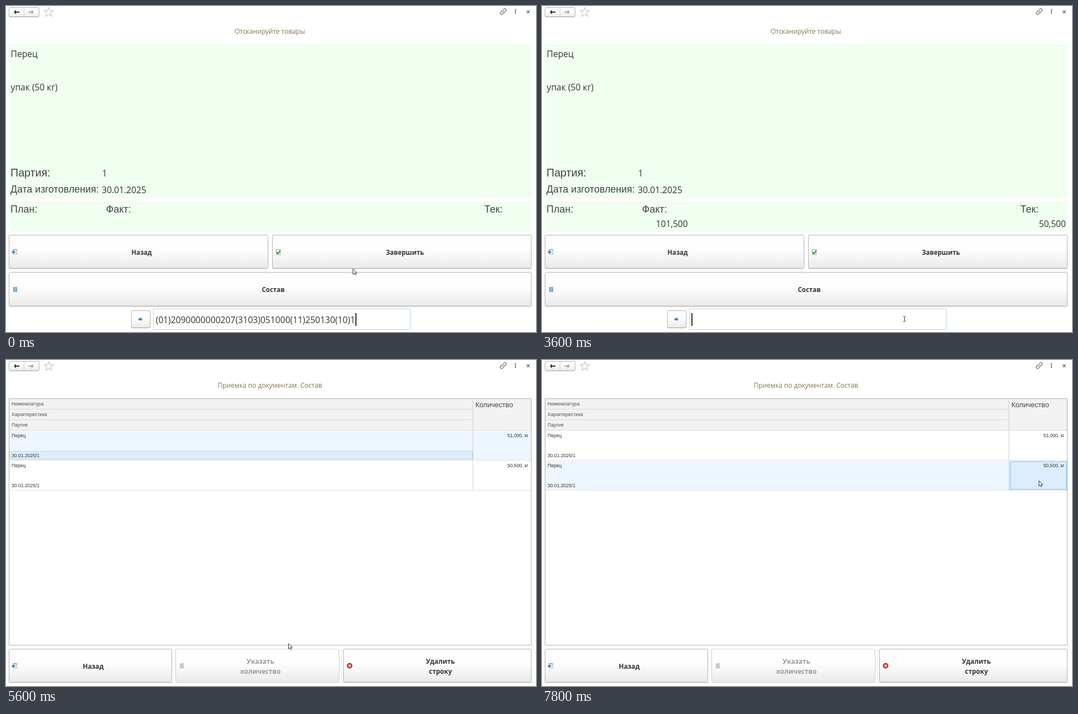
Animation, 954 px wide and 587 px high, one loop 8000 ms. Source, as an HTML page with a canvas:

```html
<!DOCTYPE html>
<html lang="ru">
<head>
<meta charset="utf-8">
<style>
html, body { margin: 0; width: 100%; height: 100%; overflow: hidden; background: #fff; }
canvas { display: block; }
</style>
</head>
<body>
<canvas id="stage" width="954" height="587"></canvas>
<script>
const ctx = document.getElementById('stage').getContext('2d');
const LOOP = 8000, STEP = 200;
const UI = '"Open Sans", sans-serif', ARIAL = '"Liberation Sans", Arial, sans-serif';
const DARK = '#333', BLUE = '#2f78b0', BODY = 15.65;

// Pointer positions: time, x, y
const pointerPath = [
  [0, 624, 473], [200, 627, 483], [400, 640, 515], [600, 652, 550], [800, 652, 562],
  [2800, 652, 563], [4000, 650, 557], [4200, 622, 545], [4400, 572, 529],
  [4600, 532, 516], [4800, 512, 511], [5000, 508, 510],
  [6200, 530, 496], [6400, 640, 400], [6600, 790, 270], [6800, 878, 190],
  [7000, 893, 168], [7200, 895, 165], [7400, 895, 190], [7600, 894, 217]
];

function text(str, x, y, size, { color = DARK, font = UI, align = 'left', weight = 400 } = {}) {
  ctx.font = `${weight} ${size}px ${font}`;
  ctx.fillStyle = color;
  ctx.textAlign = align;
  ctx.fillText(str, x, y);
}

function rect(x, y, w, h, fill) {
  ctx.fillStyle = fill;
  ctx.fillRect(x, y, w, h);
}

function frame(x, y, w, h, color, radius = 0, width = 1) {
  ctx.beginPath();
  ctx.roundRect(x + width / 2, y + width / 2, w - width, h - width, radius);
  ctx.strokeStyle = color;
  ctx.lineWidth = width;
  ctx.stroke();
}

function path(d, x, y, { fill, stroke, width = 1 }) {
  const shape = new Path2D(d);
  ctx.save();
  ctx.translate(x, y);
  if (fill) { ctx.fillStyle = fill; ctx.fill(shape); }
  if (stroke) { ctx.strokeStyle = stroke; ctx.lineWidth = width; ctx.stroke(shape); }
  ctx.restore();
}

function button(x, y, w, h, { state = 'normal', border = '#b2b2b2' } = {}) {
  const shade = ctx.createLinearGradient(0, y, 0, y + h);
  shade.addColorStop(0, state === 'hover' ? '#fafafa' : '#fff');
  shade.addColorStop(.45, state === 'hover' ? '#f6f6f6' : '#fdfdfd');
  shade.addColorStop(1, state === 'hover' ? '#e2e2e2' : '#e9e9e9');
  ctx.beginPath();
  ctx.roundRect(x, y, w, h, 2);
  ctx.fillStyle = state === 'pressed' ? '#e9e9e9' : shade;
  ctx.fill();
  frame(x, y, w, h, state === 'pressed' ? '#96a09c' : border, 2);
  if (state === 'pressed') rect(x + 1, y, w - 2, 2, '#8b9993');
  else if (border === '#b2b2b2') rect(x + 2, y + h - 1, w - 4, 1, '#9c9c9c');
}

function label(str, x, y, size, color = DARK) {
  text(str, x, y, size, { color, align: 'center', weight: 700 });
}

function title(str) {
  text(str, 475, 50, 11.9, { color: '#85774f', align: 'center' });
}

function backIcon(x, y) {
  rect(x + 2, y, 8, 9, '#7fb0d2');
  rect(x + 3, y + 2, 6, 6, '#f4faff');
  path('M0 5L4 2V4H7V6H4V8Z', x, y, { fill: BLUE });
}

function gridIcon(x, y, color, light) {
  rect(x, y, 7, 9, color);
  for (let row = 0; row < 4; row++) rect(x + 1, y + 1 + row * 2, 5, 1, light);
}

function header() {
  button(5, 2, 55, 18);
  rect(32, 3, 1, 16, '#ccc');
  const arrow = 'M-5 0L-1 -4V-1H5V1H-1V4Z';
  path(arrow, 19, 11, { fill: '#333' });
  path('M5 0L1 -4V-1H-5V1H1V4Z', 45, 11, { fill: '#a6a6a6' });
  let star = '';
  for (let i = 0; i < 10; i++) {
    const r = i % 2 ? 3.6 : 9, a = i * Math.PI / 5;
    star += (i ? 'L' : 'M') + r * Math.sin(a) + ' ' + -r * Math.cos(a);
  }
  path(star + 'Z', 77, 11.5, { stroke: '#b8b8b8' });

  ctx.save();
  ctx.translate(895, 10);
  ctx.rotate(-Math.PI / 4);
  path('M1 -2.5H-4A2.5 2.5 0 0 0 -4 2.5H-1M-1 2.5H4A2.5 2.5 0 0 0 4 -2.5H2M-2.5 0H2.5', 0, 0, { stroke: '#555' });
  ctx.restore();
  for (const y of [6, 9, 12]) rect(916, y, 2, 2, '#555');
  path('M-2.5 -2.5L2.5 2.5M2.5 -2.5L-2.5 2.5', 940, 10.5, { stroke: '#555', width: 1.1 });
}

function scanScreen(t, pointer) {
  const pressed = t >= 5400;
  const code = t < 1400 ? '051000' : t >= 2600 && t < 3600 ? '050500' : '';
  const arial = { font: ARIAL, color: '#444' };

  title('Отсканируйте товары');
  rect(5, 69, 941, 277, '#f0fff0');
  rect(5, 352, 941, 54, '#f0fff0');
  text('Перец', 8.5, 92, BODY);
  text('упак (50 кг)', 8.5, 151.5, BODY);
  text('Партия:', 8, 307, 19.7, arial);
  text('1', 173, 307, BODY);
  text('Дата изготовления:', 8, 336, 17.75, arial);
  text('30.01.2025', 172.5, 337, BODY);
  text('План:', 8, 372, 18, arial);
  text('Факт:', 180, 372, 18, arial);
  text('Тек:', 861, 372, 18, arial);
  if (t >= 1400) {
    const second = t >= 3600;
    text(second ? '101,500' : '51,000', 262.5, 397.5, BODY, { align: 'right' });
    text(second ? '50,500' : '51,000', 943, 397.5, BODY, { align: 'right' });
  }

  button(5, 412, 467, 61);
  backIcon(10, 438);
  label('Назад', 244, 447.5, 11.5);
  button(479, 412, 467, 61);
  rect(486, 438, 8, 10, '#9aaba0');
  rect(487, 439, 6, 8, '#f5fff5');
  path('M487 443L489.5 446L494 440', 0, 0, { stroke: '#209a35', width: 2 });
  label('Завершить', 718, 447.5, 11.5);

  const hovered = pointer.y > 479 && pointer.y < 541;
  button(5, 479, 941, 62, { state: pressed ? 'pressed' : hovered ? 'hover' : 'normal' });
  if (pressed) frame(3, 477, 945, 66, '#cfe4f2', 2);
  const shift = pressed ? 1 : 0;
  gridIcon(13, 506 + shift, '#5b93bb', '#c5dff0');
  label('Состав', 481, 515 + shift, 11.5);

  button(225, 548, 35, 32);
  path('M-3.5 -1.5H0V-3.5L3.5 0L0 3.5V1.5H-3.5Z', 242, 564, { fill: BLUE });
  if (pressed) {
    frame(267, 547, 460, 35, '#b5b5b5', 1);
    return;
  }
  frame(265, 545, 463, 38, '#b9d8ec');
  let caret = 269;
  if (code) {
    const str = `(01)2090000000207(3103)${code}(11)250130(10)1`;
    text(str, 269.5, 571, BODY);
    caret = 270 + ctx.measureText(str).width;
  }
  rect(Math.round(caret), 553, 1.6, 23, '#000');
}

function tableScreen(t) {
  const row = t >= 7800 ? 1 : 0;
  const top = 127 + row * 54;
  const small = { font: ARIAL };

  title('Приемка по документам. Состав');
  rect(6, 70, 939, 57, '#f2f2f2');
  for (const y of [88, 107]) rect(6, y, 835, 1, '#dadada');
  rect(6, 126, 939, 1, '#dadada');
  rect(6, top + 1, 939, 53, '#edf6fe');
  for (const y of [18, 36]) rect(6, top + y, 835, 1, '#f5faff');
  for (const y of [180, 234]) rect(6, y, 939, 1, '#e2e2e2');
  rect(840, 70, 1, 165, '#d2d2d2');

  const cell = t < 7200 ? [6, 164, 834, 15] : [842, top + 1, 103, 52];
  rect(...cell, '#dceefd');
  frame(...cell, '#b0d5f2', 0, t < 7200 ? 1 : 2);
  frame(5, 69, 941, 445, '#b0b0b0');

  ['Номенклатура', 'Характеристика', 'Партия'].forEach((name, i) =>
    text(name, 10, 82 + i * 19, 8.6, { font: ARIAL, color: '#555' }));
  text('Количество', 845, 85, 12.6, { font: ARIAL, color: '#444' });
  ['51,000, кг', '50,500, кг'].forEach((amount, i) => {
    const y = 139 + i * 54;
    text('Перец', 10, y, 8.6, small);
    text('30.01.2025/1', 10, y + 36, 8.6, small);
    text(amount, 940.5, y, 8.6, { font: ARIAL, align: 'right' });
  });

  button(5, 520, 294, 61);
  backIcon(10, 546);
  label('Назад', 157, 556, 11.8);
  button(305, 520, 295, 61, { border: '#d0d0d0' });
  gridIcon(313, 546, '#bcbcbc', '#dedede');
  label('Указать', 458, 547, 11.8, '#999');
  label('количество', 458, 565, 11.8, '#999');
  for (let y = 522; y < 580; y += 4) rect(603, y, 1, 2, '#ccc');
  button(607, 520, 339, 61);
  ctx.beginPath();
  ctx.arc(618.5, 550.5, 5, 0, 2 * Math.PI);
  ctx.fillStyle = '#d3302b';
  ctx.fill();
  path('M-2 -2L2 2M2 -2L-2 2', 618.5, 550.5, { stroke: '#fff', width: 1.2 });
  label('Удалить', 782, 547, 11.8);
  label('строку', 782, 565, 11.8);
}

function drawPointer({ x, y }, overInput) {
  if (overInput) {
    path('M-2.5 -4.5H-.5M.5 -4.5H2.5M0 -4V4M-2.5 4.5H-.5M.5 4.5H2.5', x + .5, y + .5, { stroke: '#333' });
  } else {
    path('M.5 .5V10L2.7 8L4.2 11.3L5.9 10.5L4.5 7.3H7.3Z', x, y, { fill: '#fff', stroke: '#333' });
  }
}

function draw(now) {
  const t = Math.floor(now % LOOP / STEP) * STEP;
  const [, x, y] = pointerPath.findLast(([time]) => time <= t);
  const pointer = { x, y };
  rect(0, 0, 954, 587, '#fff');
  header();
  if (t < 5600) scanScreen(t, pointer);
  else tableScreen(t);
  drawPointer(pointer, t < 5600 && y > 545);
}

const start = performance.now();
function tick() {
  draw(performance.now() - start);
  requestAnimationFrame(tick);
}
tick();
</script>
</body>
</html>
```
